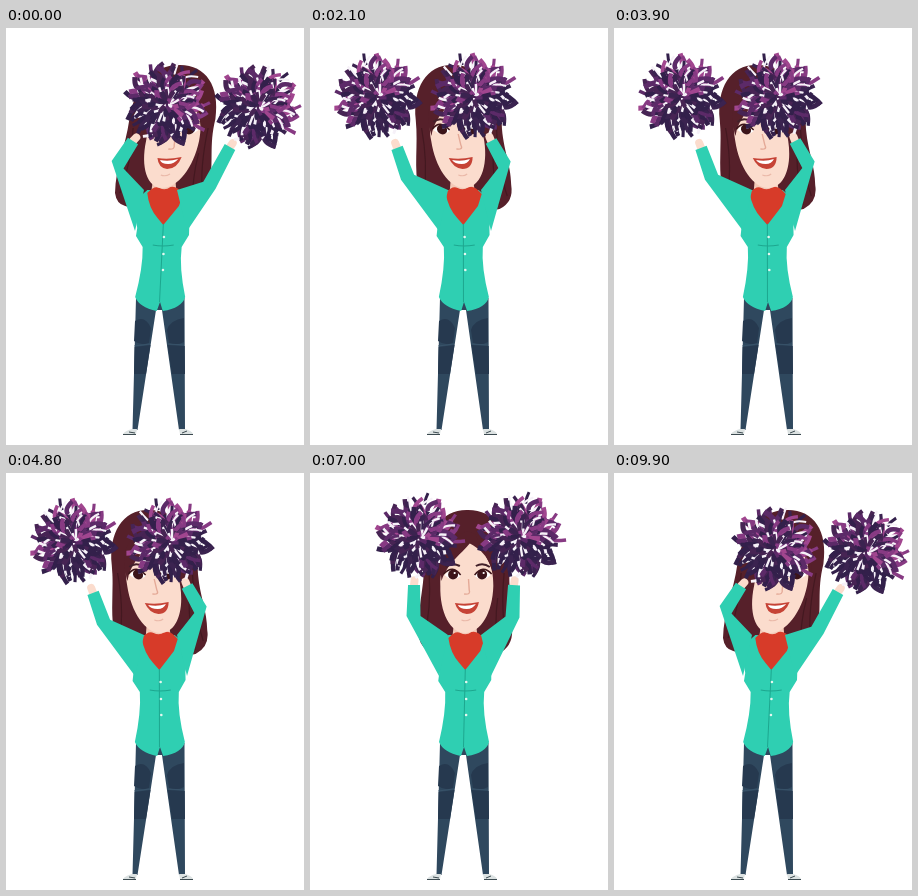
Animation of 298 by 417 pixels, one loop 10 s. Source, as an HTML page:

```html
<!DOCTYPE html>
<html lang="en">
<head>
<meta charset="utf-8">
<title>Cheering</title>
<style>
  html, body { margin: 0; width: 100%; height: 100%; overflow: hidden; background: #fff; }
  svg { display: block; width: 100%; height: 100%; }
  .sleeve { fill: #2fcfb2; }
  .hand { fill: none; stroke: #fbdccd; stroke-width: 8; stroke-linecap: round; }
</style>
</head>
<body>
<svg viewBox="0 0 298 417">
  <defs><g id="pom" fill="none"></g></defs>

  <g id="legs">
    <path fill="#2f485e" d="M130 270L126.500 402H131.500L150 282H156L173 402H179L178.500 270Z"/>
    <path fill="#26394f" d="M129 293Q139 287 145 300L143 315Q135 318 128 313ZM178 290Q164 292 161 302L163 315Q171 318 178 314ZM128.500 319L144.500 317L140 346H128ZM178.700 318L161.500 317L166 346H179Z"/>
    <path fill="none" stroke="#3b566d" stroke-width=".8" d="M128 318L144 316M178 317L162 316"/>
    <path fill="#dce2e2" d="M126 401H131L130 406H117Q119 403 126 401ZM173 401H179Q186 403 187 406H174Z"/>
    <path fill="none" stroke="#3c4a50" d="M117 406.500H130M174 406.500H187M123 404L129 405M181 403L176 405"/>
  </g>

  <g id="hair">
    <path fill="#56202a" d="M156 37C130 36 113 59 113 92C113 118 106 139 109 165Q112 176 121 178Q136 184 153 172Q175 184 188 181Q203 174 202 157C204 135 196 118 199 91C199 58 182 37 156 37Z"/>
    <path fill="none" stroke="#431820" stroke-width="1.200" d="M118 100Q121 135 114 165M193 100Q190 140 197 168M187 125Q184 150 188 177"/>
  </g>
  <g id="torso">
    <path fill="#2fcfb2" d="M138 162Q127 170 126 185L129 200L128 208L135 219Q136 239 129 269Q133 279 151 283L154 274L157 283Q176 280 179 269Q172 239 174 219L181 207L181 199L184 185Q182 169 171 162Z"/>
    <path fill="#f3c9b8" d="M144 145H165L167 163L154 172L142 164Z"/>
    <path fill="#d73b29" d="M138 165Q145 157 150 160Q156 163 161 159Q167 157 174 166L170 178L155 197L149 190Q140 180 138 165Z"/>
    <path fill="none" stroke="#1da78f" stroke-width="1" d="M155 196L153.500 274M145 217Q155 219 166 217"/>
    <g fill="#e5f7ef"><circle cx="156" cy="209" r="1.300"/><circle cx="156" cy="226" r="1.300"/><circle cx="156" cy="242" r="1.300"/></g>
  </g>
  <g id="face">
    <path fill="#fbdccd" d="M154 69C138 74 128 90 129 113C129 139 140 160 155 160C171 160 182 139 182 113C182 91 173 77 154 69Z"/>
    <path fill="#56202a" d="M163 62C153 80 137 86 130 108Q124 70 154 58Q183 63 184 108C180 91 172 82 163 62Z"/>
    <path fill="none" stroke="#43212a" stroke-width="2" d="M134 94Q140 89 148 93M164 93Q171 89 178 94"/>
    <path fill="#fff" d="M133 102Q141 92 149 103Q141 110 133 102ZM163 103Q171 92 179 102Q171 110 163 103Z"/>
    <g fill="#3c151a"><circle cx="141.500" cy="101.500" r="5"/><circle cx="170.500" cy="101.500" r="5"/></g>
    <g fill="#fff"><circle cx="143" cy="100" r="1.100"/><circle cx="172" cy="100" r="1.100"/></g>
    <path fill="none" stroke="#3c151a" stroke-width="1.500" d="M132 101Q141 91 149 102M163 102Q171 91 180 101"/>
    <path fill="none" stroke="#e4a997" stroke-width="1.400" d="M157 106L158 117Q160 122 153 121"/>
    <path fill="#c64336" d="M144 130Q155 132 168 129Q166 141 156 141Q147 140 144 130Z"/>
    <path fill="#fff" d="M147 132Q156 134 165 131Q162 136 156 136Q149 136 147 132Z"/>
    <path fill="none" stroke="#eab9a9" d="M151 147Q156 149 160 146"/>
  </g>

  <path class="hand" id="handL"/><path class="hand" id="handR"/>
  <path class="sleeve" id="armL"/><path class="sleeve" id="armR"/>
  <use href="#pom" id="pomL"/><use href="#pom" id="pomR"/>
</svg>
<script>
const get = id => document.getElementById(id);
const set = (id, name, value) => get(id).setAttribute(name, value);

let seed = 29;
const random = () => (seed = seed * 16807 % 2147483647) / 2147483647;

// Curled ribbons, laid from the rim towards the middle.
function makePom() {
  const colours = ['#33204b', '#3b2350', '#472454', '#5c2a68', '#873a83', '#a1468f'];
  const ribbon = (angle, from, to, colour, width) => {
    const at = (r, a) => (Math.cos(a) * r).toFixed(1) + ' ' + (Math.sin(a) * r).toFixed(1);
    const curl = (random() - .5) * .6;
    return `<path stroke="${colour}" stroke-width="${width.toFixed(1)}" d="M${at(from, angle)}Q${at((from + to) / 2, angle - curl / 2)} ${at(to, angle + curl)}"/>`;
  };
  let marks = '<circle r="29" fill="#33204b"/>';
  const count = 210;
  for (let i = 0; i < count; i++) {
    const angle = i * 2.39996;
    const reach = 46 - 2 * Math.sin(angle);
    const outer = reach * Math.sqrt(1 - i / count * .96) - random() * 9;
    const shade = Math.sin(angle) < .2 ? 0 : 2;
    const tone = Math.max(0, Math.floor(random() * 6 - shade));
    const from = Math.max(0, outer - 11 - random() * 9);
    const white = i > 25 && i % 4 === 0;
    marks += white
      ? ribbon(angle, from, outer, '#f6f1f8', 2 + random())
      : ribbon(angle, from, outer, colours[tone], 3 + random() * 2);
  }
  get('pom').innerHTML = marks;
}

// Each joint is given at three sways and blended by a quadratic.
const sways = [-.71, .12, 1];
const arms = {
  L: { shoulder: [138, 162], armpit: [129, 203], elbow: [[98, 149], [104, 143], [112, 137]],
       cuff: [[87, 120], [104, 112], [127, 113]], pom: [[68, 70], [109, 66], [160, 77]] },
  R: { shoulder: [171, 162], armpit: [181, 203], elbow: [[194, 137], [202, 144], [203, 157]],
       cuff: [[181, 113], [204, 112], [224, 119]], pom: [[164, 70], [210, 65], [251, 80]] }
};

function blend(points, s) {
  const weights = sways.map((a, i) =>
    sways.reduce((w, b, j) => i === j ? w : w * (s - b) / (a - b), 1));
  return [0, 1].map(axis => points.reduce((sum, p, i) => sum + p[axis] * weights[i], 0));
}

function swayAt(time) {
  const step = Math.floor(time % 10000 / 100) % 9;
  const degrees = step < 4 ? step * 45 : 135 + (step - 3) * 35.5;
  return Math.cos(degrees * Math.PI / 180);
}

// A sleeve of even width below the cuff that widens from elbow to shoulder.
function sleevePath({ shoulder, armpit }, elbow, cuff, outward) {
  const [dx, dy] = [cuff[0] - elbow[0], cuff[1] - elbow[1]];
  const scale = outward / Math.hypot(dx, dy);
  const offset = ([x, y], width) => [x - dy * scale * width, y + dx * scale * width];
  return `M${shoulder}L${offset(elbow, -6.5)}L${offset(cuff, -6)}L${offset(cuff, 6)}L${offset(elbow, 7.5)}L${armpit}Z`;
}

// Leans a part sideways while its base line stays in place.
const lean = (degrees, base) => `translate(0 ${base}) skewX(${-degrees}) translate(0 ${-base})`;

function draw(time) {
  const s = swayAt(time);
  for (const side of ['L', 'R']) {
    const arm = arms[side];
    const [elbow, cuff, pom] = [arm.elbow, arm.cuff, arm.pom].map(p => blend(p, s));
    set('arm' + side, 'd', sleevePath(arm, elbow, cuff, side === 'L' ? -1 : 1));
    set('hand' + side, 'd', `M${cuff}L${cuff.map((c, i) => c + (pom[i] - c) * .1)}`);
    set('pom' + side, 'transform', `translate(${pom}) rotate(${35 * s})`);
  }
  set('hair', 'transform', lean(8 * s, 165));
  set('face', 'transform', lean(12 * s, 165));
  set('torso', 'transform', lean(1.7 * s, 275));
}

function tick() {
  draw(performance.now());
  requestAnimationFrame(tick);
}

makePom();
tick();
</script>
</body>
</html>
```
